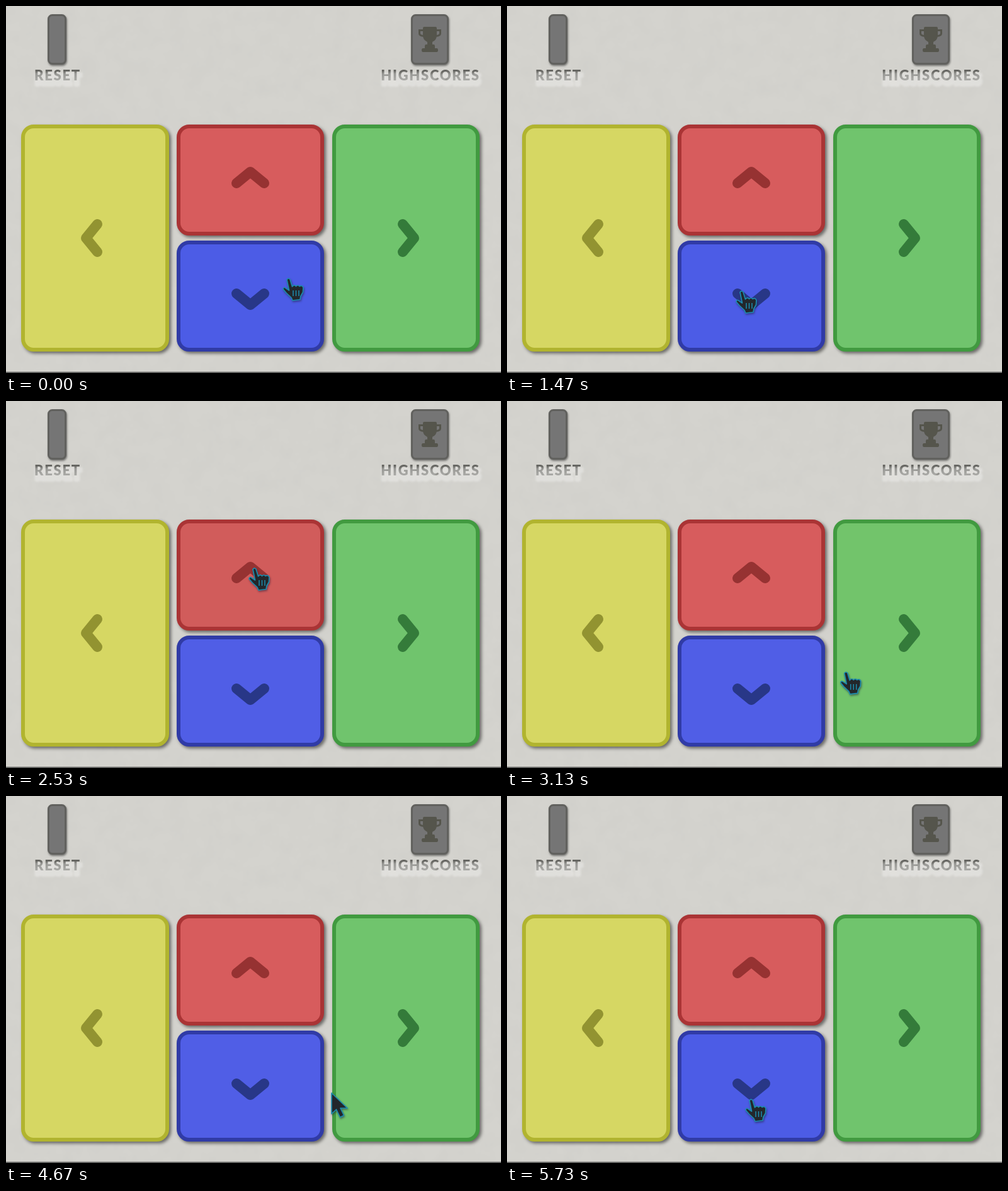
An HTML page that plays this animation: 786 by 582 pixels, repeating every 5790 ms.

```html
<!DOCTYPE html>
<html lang="en">
<head>
<meta charset="utf-8">
<title>Four-button memory game</title>
<style>
  html, body { margin: 0; width: 100%; height: 100%; overflow: hidden; background: #d2d1cc; }
  svg { position: absolute; left: 0; top: 0; display: block; }
  .pad { stroke-width: 6; filter: drop-shadow(3px 3px 2.5px rgba(0,0,0,.5)); }
  .small { fill: #757575; stroke: #61615e; stroke-width: 3; filter: drop-shadow(1px 2px 1.5px rgba(0,0,0,.45)); }
  .chevron { fill: none; stroke-width: 16; stroke-linecap: round; stroke-linejoin: round; }
  text { font: 900 22px Lato, "Open Sans", sans-serif; letter-spacing: 1.7px; text-anchor: middle; }
  .label { fill: url(#ink); }
  .glow { fill: #fff; stroke: #fff; stroke-width: 6; stroke-linejoin: round; opacity: .3; filter: blur(1.5px); }
  .cursor { fill: #23272b; stroke: #1c8cae; stroke-width: 1.7; stroke-linejoin: round;
            filter: drop-shadow(1px 2px 1.5px rgba(30,30,60,.5)); }
  .cursor line { stroke-width: 1.5; }
</style>
</head>
<body>
<svg id="stage" width="786" height="582" viewBox="0 0 786 582">
  <defs>
    <linearGradient id="ink" gradientUnits="userSpaceOnUse" x1="0" y1="102" x2="0" y2="119">
      <stop offset="0" stop-color="#63635f"/>
      <stop offset=".5" stop-color="#74746f"/>
      <stop offset="1" stop-color="#898984"/>
    </linearGradient>
    <filter id="concrete" x="0" y="0" width="1" height="1">
      <feTurbulence type="fractalNoise" baseFrequency=".035" numOctaves="3" seed="4"/>
      <feColorMatrix values="0 0 0 0 .5  0 0 0 0 .5  0 0 0 0 .48  .22 0 0 0 -.07"/>
    </filter>
  </defs>

  <rect width="786" height="582" fill="#d4d3ce"/>
  <rect width="786" height="582" filter="url(#concrete)"/>
  <rect y="580" width="786" height="2" fill="#686866"/>

  <rect class="small" x="67.5" y="14.5" width="27" height="77" rx="6"/>
  <rect class="small" x="644.5" y="14.5" width="57" height="77" rx="6"/>
  <g fill="#55554c">
    <path d="M662 35q0-2 2-2h18q2 0 2 2v11q0 8-7 11v4h2q2 0 2 3v3h3q2 0 2 3t-2 3h-22q-2 0-2-3t2-3h3v-3q0-3 2-3h2v-4q-7-3-7-11z"/>
    <path d="M663 38.5h-6.500v5q0 3.500 6.500 4M683 38.500h6.500v5q0 3.500-6.500 4" fill="none" stroke="#55554c" stroke-width="3"/>
  </g>

  <g id="labels"></g>
  <g id="pads"></g>

  <g id="hand" class="cursor">
    <path d="M-2 2Q0-1.500 3 1.500L6.500 13Q9.500 9 12.500 12.500Q15.500 9.500 18 12.500Q22 10 24 14.500L23.500 22L20 28L19 33.500L7 35L5 30.500L-3 23L-8 17Q-7.500 12.500-3 16L1.500 19Z"/>
    <line x1="8" y1="19" x2="8" y2="28"/>
    <line x1="12.500" y1="19" x2="12.500" y2="28"/>
    <line x1="17" y1="19" x2="17" y2="28"/>
  </g>
  <path id="arrow" class="cursor" d="M0 1V34L7.500 27L13.500 39.500L19.500 36.500L14 25H25Z"/>
</svg>

<script>
const LOOP = 5790;
const STEP = 200 / 3;
const STEPS = 87;
const NS = "http://www.w3.org/2000/svg";
const byId = id => document.getElementById(id);

function add(parent, tag, attrs) {
  const el = document.createElementNS(NS, tag);
  for (const key in attrs) el.setAttribute(key, attrs[key]);
  parent.append(el);
  return el;
}

for (const [label, x] of [["RESET", 82], ["HIGHSCORES", 674]]) {
  add(byId("labels"), "text", { class: "label", x, y: 118 }).textContent = label;
  add(byId("labels"), "text", { class: "glow", x: x + 2, y: 125 }).textContent = label;
}

const pads = [
  { x: 24, y: 188, w: 235, h: 360, fill: "#d6d763", hover: "#d2d360", edge: "#b1b42f",
    ink: "#929331", icon: "M145 346L127 368L145 390" },
  { x: 271, y: 188, w: 234, h: 176, fill: "#d75c5d", hover: "#d15c5b", edge: "#aa3435",
    ink: "#963232", icon: "M366 281L388 263L410 281" },
  { x: 271, y: 372, w: 234, h: 176, fill: "#505ee6", hover: "#4c5ce6", edge: "#303ba6",
    ink: "#283787", icon: "M366 456L388 474L410 456" },
  { x: 518, y: 188, w: 234, h: 360, fill: "#70c46d", hover: "#72c46b", edge: "#419a40",
    ink: "#347b3a", icon: "M630 346L648 368L630 390" }
];

for (const p of pads) {
  p.el = add(byId("pads"), "rect", {
    class: "pad", x: p.x + 3, y: p.y + 3, width: p.w - 6, height: p.h - 6,
    rx: 17, fill: p.fill, stroke: p.edge
  });
  add(byId("pads"), "path", { class: "chevron", d: p.icon, stroke: p.ink });
}

// Pointer route: step, x, y
const route = [
  [0, 448, 432], [3, 225, 390], [6, 375, 295], [9, 616, 433],
  [12, 590, 330], [15, 420, 275], [18, 210, 340], [22, 372, 452],
  [25, 580, 430], [28, 430, 285], [31, 210, 340], [34, 375, 450],
  [36, 570, 370], [38, 394, 265], [41, 205, 330], [45, 375, 450],
  [48, 585, 400], [50, 430, 285], [53, 220, 310], [56, 388, 301],
  [61, 580, 350], [64, 410, 280], [66, 225, 350], [68, 360, 455],
  [70, 517, 470], [72, 590, 400], [76, 420, 275], [80, 215, 350],
  [84, 350, 470], [86, 387, 481]
];

function knot(i) {
  const n = route.length;
  const lap = Math.floor(i / n);
  const [s, x, y] = route[i - lap * n];
  return [s + lap * STEPS, x, y];
}

// Smooth curve through the route, with the slope taken from both neighbours.
function pointerAt(step) {
  let i = route.length - 1;
  while (route[i][0] > step) i--;
  const [a, b, c, d] = [-1, 0, 1, 2].map(k => knot(i + k));
  const span = c[0] - b[0];
  const u = (step - b[0]) / span;
  return [1, 2].map(k => {
    const m0 = (c[k] - a[k]) / (c[0] - a[0]) * span;
    const m1 = (d[k] - b[k]) / (d[0] - b[0]) * span;
    const rise = c[k] - b[k];
    return b[k] + u * (m0 + u * (3 * rise - 2 * m0 - m1 + u * (m0 + m1 - 2 * rise)));
  });
}

function draw(time) {
  const step = Math.min(STEPS - 1, Math.floor((time % LOOP + 4) / STEP));
  const [x, y] = pointerAt(step);
  let over = false;
  for (const p of pads) {
    const hit = x >= p.x && x < p.x + p.w && y >= p.y && y < p.y + p.h;
    p.el.setAttribute("fill", hit ? p.hover : p.fill);
    over = over || hit;
  }
  const place = `translate(${x.toFixed(1)} ${y.toFixed(1)})`;
  for (const [id, shown] of [["hand", over], ["arrow", !over]]) {
    byId(id).setAttribute("transform", place);
    byId(id).style.display = shown ? "" : "none";
  }
}

const start = performance.now();
function tick() {
  draw(performance.now() - start);
  requestAnimationFrame(tick);
}
tick();
</script>
</body>
</html>
```
